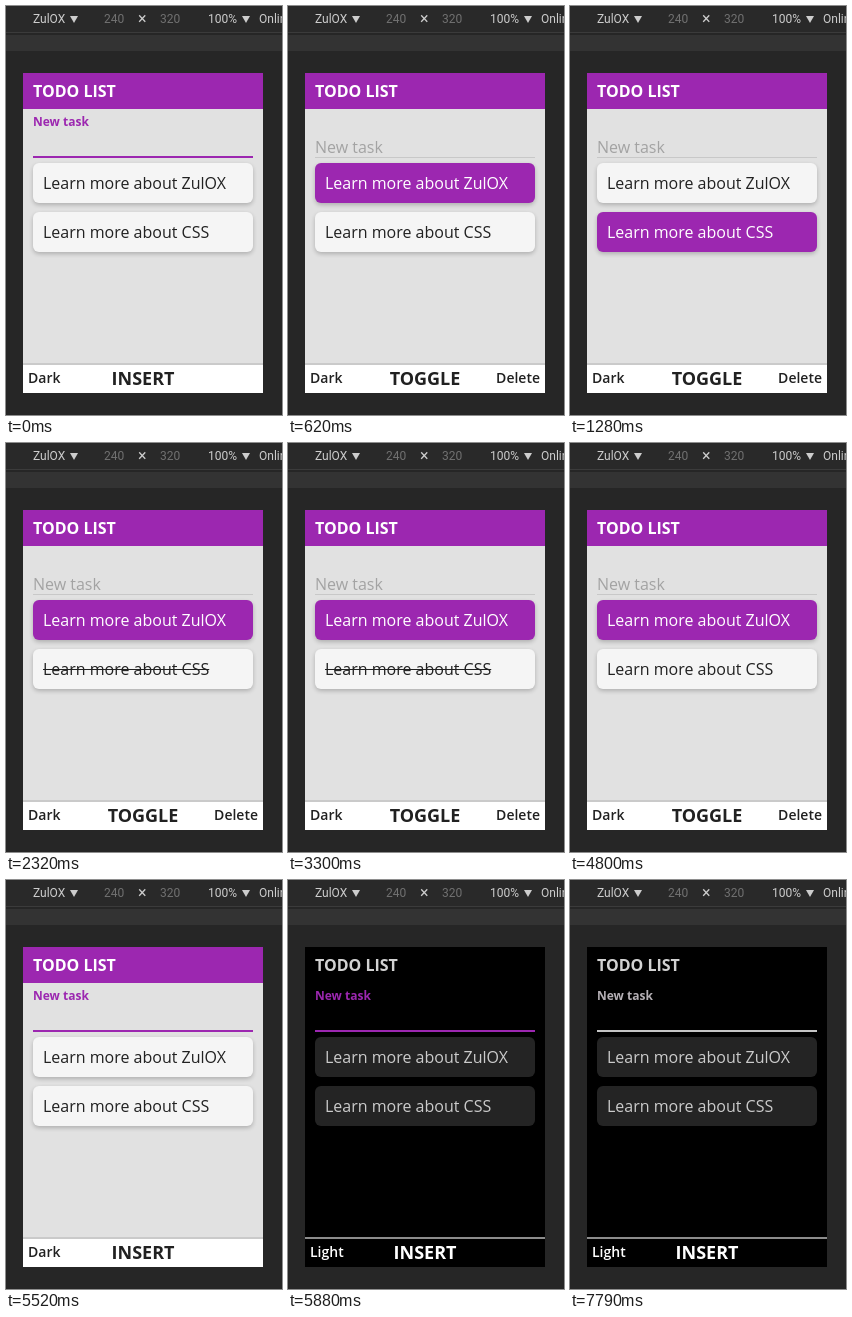
Recreate the animation shown at these times as an HTML page. Size 276 by 409 pixels, loop 8000 ms.

```html
<!DOCTYPE html>
<html lang="en">
<head>
<meta charset="utf-8">
<title>Todo list</title>
<style>
  :root { --loop: 8000ms; --accent: #9c27b0; }
  * { box-sizing: border-box; }
  html, body { margin: 0; width: 100%; height: 100%; overflow: hidden; background: #262626; }

  /* Browser toolbar */
  .stage { position: relative; width: 276px; height: 409px; overflow: hidden; background: #262626; }
  .bar {
    position: absolute; inset: 0 0 auto; height: 27px;
    background: #292929; border-bottom: 1px solid #3b3b3b;
    font: 12px/26px Roboto, sans-serif; color: #cdcdcd;
  }
  .bar span, .bar i { position: absolute; top: 0; white-space: nowrap; }
  .bar .dim { color: #717171; }
  .bar i {
    top: 10px; width: 8px; height: 7px; background: #cdcdcd;
    clip-path: polygon(0 0, 100% 0, 50% 100%);
  }
  .strip { position: absolute; inset: 29px 0 auto; height: 16px; background: #333; }

  /* App */
  .app {
    position: absolute; left: 17px; top: 67px; width: 240px; height: 320px; overflow: hidden;
    background: var(--page); color: var(--ink);
    font: 16px/22px "Open Sans", sans-serif;
    animation: theme var(--loop) step-end infinite;
  }
  .app > * { position: absolute; }
  header {
    inset: 0 0 auto; height: 36px; padding-left: 10px;
    background: var(--head); color: var(--title);
    font-weight: 700; line-height: 36px;
  }
  .label { left: 10px; white-space: nowrap; animation: label var(--loop) cubic-bezier(.4, 0, .2, 1) infinite; }
  .field { left: 10px; top: 84px; width: 220px; height: 1px; background: var(--rule); }
  .line { top: 83px; height: 2px; animation: line var(--loop) cubic-bezier(.4, 0, .2, 1) infinite; }
  .caret { left: 10px; top: 55px; width: 1px; height: 22px; background: #fff; animation: caret var(--loop) step-end infinite; }

  .card {
    left: 10px; width: 220px; height: 40px; padding-left: 10px;
    border-radius: 6px; line-height: 40px; white-space: nowrap;
    box-shadow: 0 2px 4px rgba(0, 0, 0, .22);
  }
  .first { top: 90px; animation: pick-first var(--loop) step-end infinite; }
  .second { top: 139px; animation: pick-second var(--loop) step-end infinite; }
  .first span { animation: done-first var(--loop) step-end infinite; }
  .second span { animation: done-second var(--loop) step-end infinite; }

  footer {
    inset: auto 0 0; height: 30px; background: var(--keys); color: var(--key);
    box-shadow: inset 0 2px var(--edge);
    font-weight: 600; font-size: 14px; line-height: 30px;
  }
  footer span { position: absolute; top: 0; }
  .left { left: 5px; }
  .right { right: 5px; }
  .mid { left: 0; width: 100%; text-align: center; font-size: 18px; font-weight: 700; }
  .dark { visibility: var(--is-light); }
  .light { visibility: var(--is-dark); }
  .insert { animation: insert var(--loop) step-end infinite; }
  .list-key { animation: list-key var(--loop) step-end infinite; }

  @keyframes theme {
    0% {
      --page: #e1e1e1; --ink: #212121; --head: #9c27b0; --title: #fff; --card: #f5f5f5;
      --rule: #c8c8c8; --keys: #fff; --key: #212121; --edge: #cacaca;
      --is-light: visible; --is-dark: hidden;
    }
    73.5%, 100% {
      --page: #000; --ink: #cbcbcb; --head: #000; --title: #d2d2d2; --card: #242424;
      --rule: #333; --keys: #000; --key: #fff; --edge: #8c8c8c;
      --is-light: hidden; --is-dark: visible;
    }
  }
  @keyframes label {
    0%, 6.25%, 69%, 73.5% { top: 38px; font-size: 12px; font-weight: 700; color: var(--accent); }
    7.75%, 66.5% { top: 63px; font-size: 16px; font-weight: 400; color: #a3a3a3; }
    76%, 100% { top: 38px; font-size: 12px; font-weight: 700; color: #b5b0b5; }
  }
  @keyframes line {
    0%, 6.25%, 69%, 73.5% { left: 10px; width: 220px; background: var(--accent); visibility: visible; }
    7.75%, 66.5% { left: 109px; width: 10px; background: var(--accent); visibility: hidden; }
    76%, 100% { left: 10px; width: 220px; background: #c4c4c4; visibility: visible; }
  }
  @keyframes caret {
    0%, 84.875%, 97.375%, 100% { visibility: hidden; }
    79.125%, 91.25% { visibility: visible; }
  }
  @keyframes pick-first {
    0%, 16%, 45.75%, 66.5%, 100% { background: var(--card); color: var(--ink); }
    6.25%, 29%, 60% { background: var(--accent); color: #fff; }
  }
  @keyframes pick-second {
    0%, 29%, 60%, 100% { background: var(--card); color: var(--ink); }
    16%, 45.75% { background: var(--accent); color: #fff; }
  }
  @keyframes done-first {
    0%, 41.25%, 100% { text-decoration: none; }
    33.125% { text-decoration: line-through; }
  }
  @keyframes done-second {
    0%, 50.375%, 100% { text-decoration: none; }
    23.5% { text-decoration: line-through; }
  }
  @keyframes insert {
    0%, 66.5%, 100% { visibility: visible; }
    6.25% { visibility: hidden; }
  }
  @keyframes list-key {
    0%, 66.5%, 100% { visibility: hidden; }
    6.25% { visibility: visible; }
  }
</style>
</head>
<body>
<div class="stage">
  <div class="bar">
    <span style="left:27px">ZulOX</span><i style="left:64px"></i>
    <span class="dim" style="left:98px">240</span>
    <span style="left:132px;font-size:16px">×</span>
    <span class="dim" style="left:154px">320</span>
    <span style="left:202px">100%</span><i style="left:236px"></i>
    <span style="left:253px">Online</span>
  </div>
  <div class="strip"></div>

  <div class="app">
    <header>TODO LIST</header>
    <div class="field"></div>
    <div class="line"></div>
    <div class="label">New task</div>
    <div class="caret"></div>
    <div class="card first"><span>Learn more about ZulOX</span></div>
    <div class="card second"><span>Learn more about CSS</span></div>
    <footer>
      <span class="left dark">Dark</span>
      <span class="left light">Light</span>
      <span class="mid insert">INSERT</span>
      <span class="mid list-key">TOGGLE</span>
      <span class="right list-key">Delete</span>
    </footer>
  </div>
</div>
</body>
</html>
```
